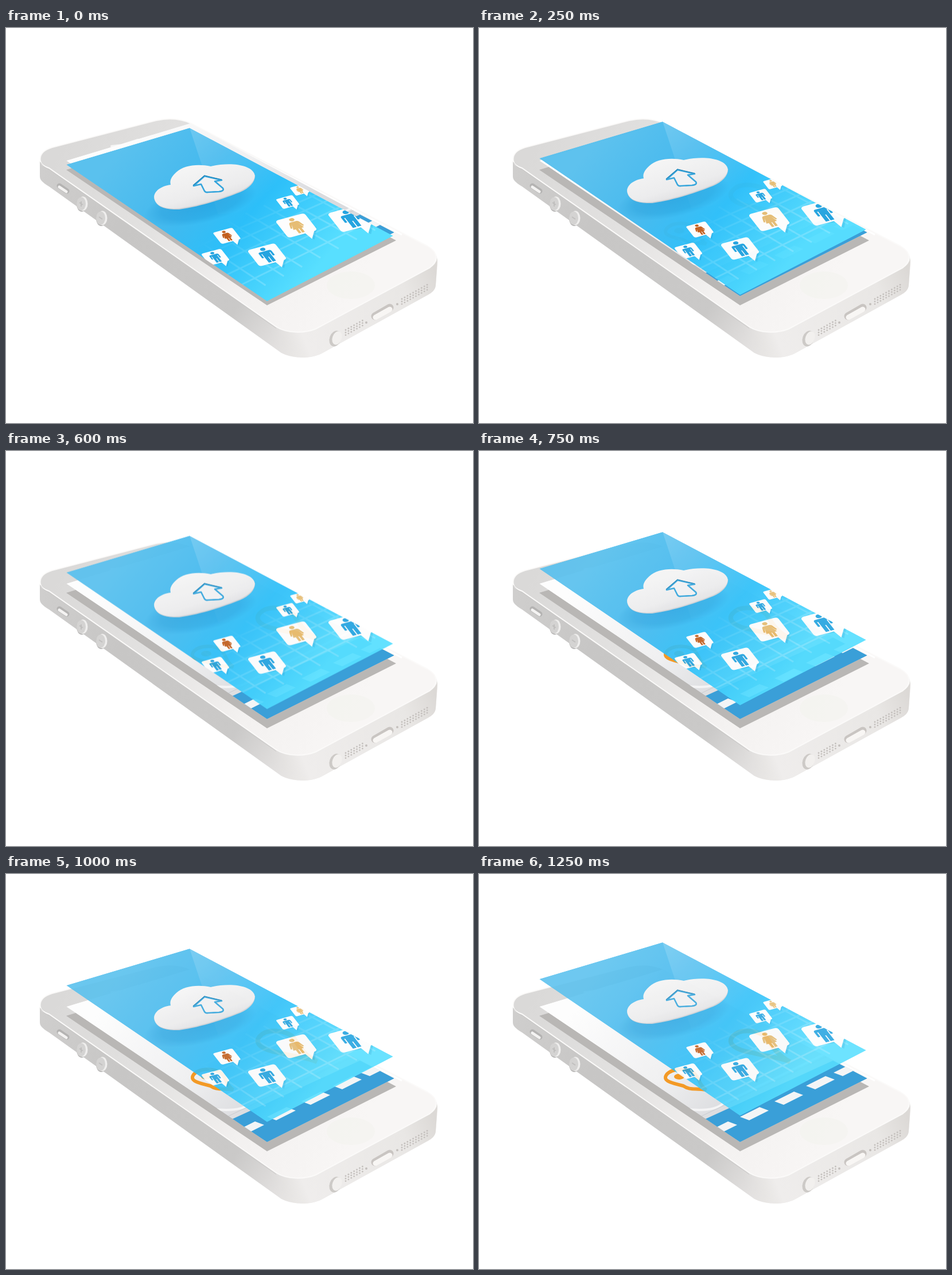
Recreate the animation shown at these times as an HTML page. Size 814x688 px, loop 1300 ms.

```html
<!DOCTYPE html>
<html lang="en">
<head>
<meta charset="utf-8">
<title>Layered phone screen</title>
<style>
  html, body { margin: 0; width: 100%; height: 100%; overflow: hidden; background: #fff; }
  svg { display: block; width: 814px; height: 688px; }
</style>
</head>
<body>
<svg viewBox="0 0 814 688">
  <defs>
    <linearGradient id="side" gradientUnits="userSpaceOnUse" x1="59" y1="250" x2="520" y2="560">
      <stop offset="0" stop-color="#cfcecd"/><stop offset=".3" stop-color="#c7c6c5"/>
      <stop offset=".75" stop-color="#cac9c8"/><stop offset=".92" stop-color="#e2e0df"/>
      <stop offset="1" stop-color="#ebe9e7"/>
    </linearGradient>
    <linearGradient id="end" gradientUnits="userSpaceOnUse" x1="470" y1="550" x2="750" y2="430">
      <stop offset="0" stop-color="#e2e0de" stop-opacity="0"/><stop offset=".16" stop-color="#efedec"/>
      <stop offset=".8" stop-color="#e9e7e5"/><stop offset="1" stop-color="#dcd9d6"/>
    </linearGradient>
    <linearGradient id="face" gradientUnits="userSpaceOnUse" x1="100" y1="200" x2="600" y2="480">
      <stop offset="0" stop-color="#dad9d8"/><stop offset=".35" stop-color="#e2e1e0"/>
      <stop offset=".7" stop-color="#f3f1f0"/><stop offset="1" stop-color="#f8f6f5"/>
    </linearGradient>
    <linearGradient id="paper" gradientUnits="userSpaceOnUse" x1="180" y1="220" x2="420" y2="430">
      <stop offset="0" stop-color="#fdfdfd"/><stop offset=".6" stop-color="#f0f0f1"/>
      <stop offset="1" stop-color="#dadbde"/>
    </linearGradient>
    <linearGradient id="sky" gradientUnits="userSpaceOnUse" x1="215" y1="195" x2="515" y2="450">
      <stop offset="0" stop-color="#5ac1ee"/><stop offset=".35" stop-color="#44b9ee"/>
      <stop offset=".62" stop-color="#2cbff9"/><stop offset="1" stop-color="#58dfff"/>
    </linearGradient>
    <linearGradient id="glare" gradientUnits="userSpaceOnUse" x1="322" y1="180" x2="420" y2="320">
      <stop offset="0" stop-color="#fff" stop-opacity=".16"/><stop offset="1" stop-color="#fff" stop-opacity="0"/>
    </linearGradient>
    <linearGradient id="fade" gradientUnits="userSpaceOnUse" x1="410" y1="310" x2="500" y2="410">
      <stop offset="0" stop-color="#bff0ff" stop-opacity="0"/><stop offset="1" stop-color="#bff0ff" stop-opacity=".3"/>
    </linearGradient>
    <linearGradient id="puff" gradientUnits="userSpaceOnUse" x1="330" y1="238" x2="352" y2="310">
      <stop offset="0" stop-color="#f5f5f5"/><stop offset=".7" stop-color="#ececed"/>
      <stop offset="1" stop-color="#e0e0e2"/>
    </linearGradient>
    <radialGradient id="dim">
      <stop offset="0" stop-color="#1189cc" stop-opacity=".38"/><stop offset=".7" stop-color="#1189cc" stop-opacity=".26"/>
      <stop offset="1" stop-color="#1189cc" stop-opacity="0"/>
    </radialGradient>
    <clipPath id="screen"><path d="M105 238L320 174L675 362L455 476Z"/></clipPath>
    <clipPath id="sheet"><path d="M105 231L321 166L677 356L455 467Z"/></clipPath>
    <g id="man">
      <circle cy="-.34" r=".09"/>
      <path d="M-.16-.22H.16Q.23-.22 .23-.14V.12H.16V-.1H.13V.43H.015V.12H-.015V.43H-.13V-.1H-.16V.12H-.23V-.14Q-.23-.22-.16-.22Z"/>
    </g>
    <g id="woman">
      <circle cy="-.34" r=".085"/>
      <path d="M-.1-.22H.1Q.15-.22 .17-.16L.23 .08L.18 .1L.11-.1L.18 .18H.1V.42H.015V.18H-.015V.42H-.1V.18H-.18L-.11-.1L-.18 .1L-.23 .08L-.17-.16Q-.15-.22-.1-.22Z"/>
    </g>
  </defs>

  <!-- phone -->
  <path fill="url(#side)" d="M59 236C58 222 64 213 80 208L262 161C285 156 305 158 322 166L735 380C750 389 753 400 752 412L749 448C748 457 742 461 735 465L550 567C530 577 500 576 480 566L75 276C62 268 59 264 59 258Z"/>
  <path fill="url(#end)" d="M440 499L472 521C490 532 520 532 540 524L738 418Q750 411 752 402L749 448C748 457 742 461 735 465L550 567C530 577 500 576 480 566L430 530Z"/>
  <path fill="url(#face)" stroke="#fbfaf9" stroke-width="2" d="M60 232C58 222 64 213 80 208L262 161C285 156 305 158 322 166L735 380C752 390 756 405 738 418L540 524C520 532 490 532 472 521L75 244C64 240 61 237 60 232Z"/>
  <path fill="none" stroke="#c9c8c7" d="M60 234Q64 242 76 247L471 523"/>
  <path fill="none" stroke="#fff" stroke-width="3" d="M328 172L690 360"/>
  <path fill="none" stroke="#f6f5f4" stroke-width="4" stroke-linecap="round" d="M184 206L202 204L230 195"/>
  <ellipse cx="601" cy="448" rx="42" ry="24" fill="#f4f3ee" opacity=".6"/>

  <!-- side keys -->
  <path fill="none" stroke="#b4b3b2" stroke-width="9" stroke-linecap="round" d="M93 275L106 284"/>
  <path fill="none" stroke="#f4f3f2" stroke-width="5" stroke-linecap="round" d="M93 277L105 285"/>
  <g id="keys"></g>

  <!-- ports -->
  <ellipse cx="574" cy="541" rx="10" ry="14" transform="rotate(20 574 541)" fill="#cdcac7"/>
  <ellipse cx="577" cy="540" rx="8" ry="12" transform="rotate(20 577 540)" fill="#f2f0ee"/>
  <path fill="none" stroke="#c9c5c2" stroke-width="13" stroke-linecap="round" d="M643 502L669 487"/>
  <path fill="none" stroke="#f8f6f4" stroke-width="9" stroke-linecap="round" d="M644 504L669 490"/>
  <g id="holes" fill="#c4c0bd"></g>

  <!-- screen shadow and lower sheet -->
  <path fill="#b9b7b5" d="M105 247L321 182L680 370L455 483Z"/>
  <g clip-path="url(#sheet)">
    <path fill="url(#paper)" d="M105 231L321 166L677 356L455 467Z"/>
    <path fill="none" stroke="#f4f4f5" stroke-width="4" d="M330 405Q405 419 425 400L610 310"/>
    <path fill="none" stroke="#c9cbcf" d="M385 423L610 316"/>
    <g fill="none" stroke="#f39a26" stroke-width="6">
      <path d="M396 376C376 373 368 377 356 369C336 364 324 361 325 354C327 341 356 335 374 346C384 354 382 366 396 376Z"/>
      <path stroke-width="8" d="M542 327C520 318 500 318 475 311C449 307 431 296 442 283C456 267 492 273 502 286C511 300 518 314 542 327Z"/>
    </g>
    <ellipse cx="349" cy="353" rx="9" ry="5" fill="#f39a26"/>
    <path fill="#3a9fd8" d="M394 427L617 325L677 356L455 467Z"/>
    <g id="dashes" fill="#f3f5f6"></g>
  </g>

  <!-- upper sheet -->
  <g id="top" clip-path="url(#screen)">
    <path fill="url(#sky)" d="M105 238L320 174L675 362L455 476Z"/>
    <path id="grid" fill="none" stroke="url(#fade)" stroke-width="3"/>
    <path fill="url(#glare)" d="M320 174L370 325L560 301Z"/>
    <ellipse cx="339" cy="306" rx="100" ry="34" transform="rotate(-13 339 306)" fill="url(#dim)"/>
    <path fill="#cfd2d6" d="M287 274C266 277 256 288 259 299C263 312 279 317 302 316C340 311 380 297 408 286C425 279 435 267 434 256L300 270Z"/>
    <path fill="url(#puff)" d="M287 273C266 276 255 288 259 299C263 311 279 316 302 314C340 309 380 295 408 284C426 276 436 264 433 254C427 238 390 233 357 241C335 236 309 239 297 251C288 259 285 266 287 273Z"/>
    <path fill="#f1f1f2" stroke="#35a5dc" stroke-width="2.6" stroke-linejoin="round" d="M327 275L346 258L376 265L364 267L378 279Q381 284 371 285L352 286Q347 287 345 282L340 272Z"/>
    <path fill="none" stroke="#1f83b8" stroke-width="1.2" d="M326 274L346 257L376 264"/>
    <g id="bubbles"></g>
  </g>
</svg>
<script>
const put = (id, html) => { document.getElementById(id).innerHTML = html; };

// side keys
put('keys', [[133, 306, '+'], [167, 331, '-']].map(([x, y, sign]) => `
  <ellipse cx="${x - 1}" cy="${y + 1}" rx="9" ry="13" fill="#b9b8b7"/>
  <ellipse cx="${x + 1}" cy="${y}" rx="8.5" ry="12.5" fill="#efeeed"/>
  <ellipse cx="${x - 2}" cy="${y}" rx="8" ry="11.5" fill="#d4d3d2"/>
  <path d="M${x - 5} ${y - 2}l6 4${sign === '+' ? 'm-3-6v9' : ''}" stroke="#c0bfbe" stroke-width="2"/>`).join(''));

// speaker holes and screws
let holes = '';
const dot = (x, y, r) => { holes += `<circle cx="${x}" cy="${y}" r="${r}"/>`; };
for (const [x, y, cols] of [[592, 526, 7], [690, 472, 10]])
  for (let i = 0; i < cols; i++)
    for (let j = 0; j < 3; j++) dot(x + i * 4.9, y - i * 2.75 + j * 4.4, 1.4);
dot(628, 513, 2);
dot(682, 481, 2);
put('holes', holes);

// road markings
put('dashes', [[425, 441], [480, 416], [540, 389], [595, 362], [643, 339]].map(([x, y]) =>
  `<path d="M${x - 25} ${y + 7}l34-17l16 6l-34 17z"/>`).join(''));

// map grid on the upper sheet
const lerp = (a, b, k) => a + (b - a) * k;
const at = (u, v) => [
  lerp(lerp(105, 320, u), lerp(455, 675, u), v),
  lerp(lerp(238, 174, u), lerp(476, 362, u), v)
].map(n => n.toFixed(1)).join(' ');
let grid = '';
for (let v = 0.62, step = 0.055; v < 0.95; v += step, step += 0.006) grid += `M${at(0, v)}L${at(1, v)}`;
for (let u = 0.1; u < 1; u += 0.145) grid += `M${at(u, 0.56)}L${at(u, 0.93)}`;
document.getElementById('grid').setAttribute('d', grid);

// speech bubbles: x, y, scale, figure, colour
const blue = '#25a4e0', sand = '#e6bd74', rust = '#c25f1e';
put('bubbles', [
  [512, 282, 0.5, 'woman', sand],
  [491, 303, 0.6, 'man', blue],
  [506, 344, 1.06, 'woman', sand],
  [601, 332, 1.18, 'man', blue],
  [385, 362, 0.71, 'woman', rust],
  [365, 399, 0.72, 'man', blue],
  [455, 395, 1, 'man', blue]
].map(([x, y, s, who, color]) => {
  const m = [48, -13, 22, 28].map(n => (n * s).toFixed(2)).join(' ');
  return `<g transform="matrix(${m} ${x} ${y})">
    <path fill="#1689c4" opacity=".2" d="M-.3 .5L.08 .56L.2 .92L.44 .54L.54 .3Z"/>
    <rect x="-.5" y="-.5" width="1" height="1" rx=".11" fill="#fdfdfd"/>
    <path fill="#fdfdfd" d="M.08 .48L.15 .85L.4 .48Z"/>
    <use href="#${who}" fill="${color}"/></g>`;
}).join(''));

// the upper sheet lifts in 50 ms steps
document.getElementById('top').animate([
  { transform: 'translateY(0px)', opacity: 1 },
  { transform: 'translateY(-57.2px)', opacity: 0.87 }
], { duration: 1300, iterations: Infinity, easing: 'steps(26)' });
</script>
</body>
</html>
```
